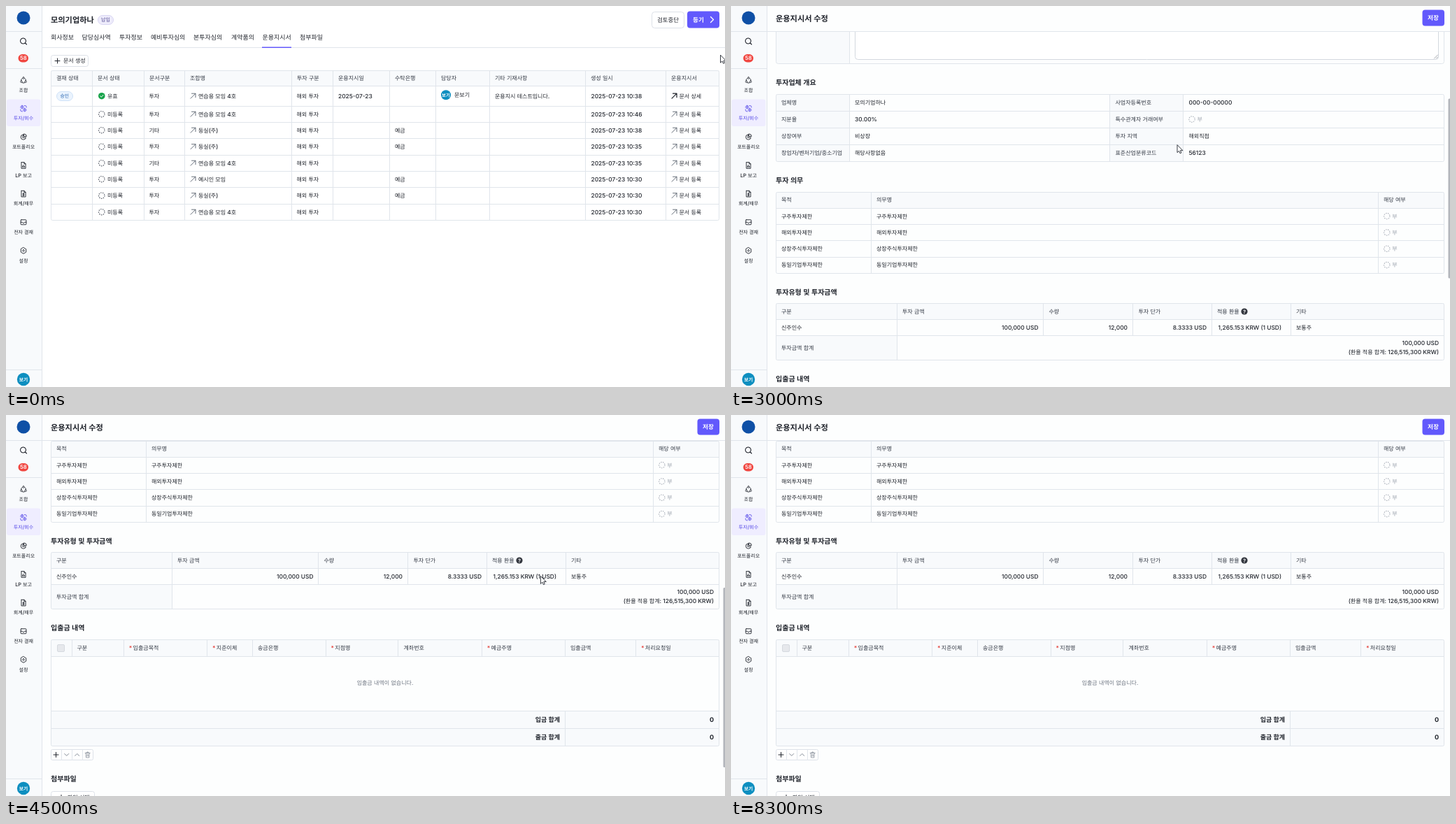
Recreate the animation shown at these times as an HTML page with a canvas. Size 1028 by 545 pixels, loop 9 s.

```html
<!DOCTYPE html>
<html lang="ko">
<head>
<meta charset="utf-8">
<title>운용지시서</title>
<style>
html, body { margin: 0; width: 100%; height: 100%; overflow: hidden; background: #fff; }
canvas { display: block; width: 1028px; height: 545px; }
</style>
</head>
<body>
<canvas id="stage"></canvas>
<script>
const W = 1028, H = 545, LOOP = 9000, STEP = 100;
const INK = '#20242c', SOFT = '#343a45', MUTED = '#9aa1ac', LINE = '#e0e5eb', PALE = '#f8fafc', PAGE = '#fdfefe';
const ACCENT = '#6259fc', RED = '#e5403a', TEAL = '#0e8fc0';
const HANGUL = '"Noto Sans CJK KR", "Noto Sans", sans-serif', LATIN = 'Inter, "Noto Sans", sans-serif';
const COMPANY = '모의기업하나', FUND = '연습용 모임 4호', SMALL = '둥실(주)', GROUP = '예시인 모임';
const PERSON = '문보기', NICK = '보기', BANK = '예금';

const canvas = document.getElementById('stage');
const ctx = canvas.getContext('2d');
const dpr = window.devicePixelRatio || 1;
canvas.width = W * dpr;
canvas.height = H * dpr;

// Hangul and Latin runs are set in separate fonts.
function text(str, x, y, size = 8, color = INK, weight = 500, align = 0) {
  const runs = str.match(/[가-힣]+|[^가-힣]+/g).map(s => {
    const font = /[가-힣]/.test(s) ? `${weight} ${size}px ${HANGUL}` : `${weight} ${size * 1.05}px ${LATIN}`;
    ctx.font = font;
    return { s, font, w: ctx.measureText(s).width };
  });
  x -= align * runs.reduce((sum, r) => sum + r.w, 0);
  ctx.fillStyle = color;
  for (const r of runs) {
    ctx.font = r.font;
    ctx.fillText(r.s, x, y + size * 0.37);
    x += r.w;
  }
}

function fill(x, y, w, h, color) {
  ctx.fillStyle = color;
  ctx.fillRect(x, y, w, h);
}

function box(x, y, r, b, radius, color, border) {
  ctx.beginPath();
  ctx.roundRect(x + 0.5, y + 0.5, r - x - 1, b - y - 1, radius);
  if (color) { ctx.fillStyle = color; ctx.fill(); }
  if (border) { ctx.strokeStyle = border; ctx.lineWidth = 1; ctx.stroke(); }
}

// A solid button without a border fills its whole box.
function button(x, y, r, b, radius, color) {
  ctx.beginPath();
  ctx.roundRect(x, y, r - x, b - y, radius);
  ctx.fillStyle = color;
  ctx.fill();
}

function disc(x, y, r, color) {
  ctx.beginPath();
  ctx.arc(x, y, r, 0, 7);
  ctx.fillStyle = color;
  ctx.fill();
}

function path(d, x, y, color = INK, width = 1, scale = 1) {
  ctx.save();
  ctx.translate(x, y);
  ctx.scale(scale, scale);
  ctx.strokeStyle = color;
  ctx.lineWidth = width;
  ctx.lineCap = ctx.lineJoin = 'round';
  ctx.stroke(new Path2D(d));
  ctx.restore();
}

function dotted(x, y, color) {
  const r = 4.2, dash = Math.PI * r / 9;
  ctx.beginPath();
  ctx.arc(x, y, r, 0, Math.PI * 2);
  ctx.strokeStyle = color;
  ctx.lineWidth = 1.1;
  ctx.setLineDash([dash, dash]);
  ctx.stroke();
  ctx.setLineDash([]);
}

const hline = (x, r, y) => fill(x, y, r - x, 1, LINE);
const vline = (x, y, b) => fill(x, y, 1, b - y, LINE);

function grid(xs, ys) {
  const r = xs[xs.length - 1], b = ys[ys.length - 1];
  ys.slice(1, -1).forEach(y => hline(xs[0], r, y));
  xs.slice(1, -1).forEach(x => vline(x, ys[0], b));
  box(xs[0], ys[0], r + 1, b + 1, 2, null, LINE);
}

function label(str, x, y) {
  if (str[0] === '*') {
    text('*', x, y + 0.5, 8, RED, 600);
    text(str.slice(1), x + 5.8, y, 8, SOFT);
  } else text(str, x, y, 8, SOFT);
}

const arrowIcon = (x, y, color, width) => path('M0 7L7 0M1.5 0H7V5.5', x, y - 3.5, color, width);
const plus = (x, y) => path('M-3.5 0H3.5M0-3.5V3.5', x, y);

// Sidebar
const DOC = 'M6 2h8l5 5v15H5V2zM14 2v5h5';
const MENU = [
  ['조합', 'M12 2a3 3 0 1 0 .01 0M5 14a3 3 0 1 0 .01 0M19 14a3 3 0 1 0 .01 0M8 6a8.5 8.5 0 0 0-4 7M16 6a8.5 8.5 0 0 1 4 7M8 20.5a8 8 0 0 0 8 0'],
  ['투자/회수', 'M7.5 2a5 5 0 1 0 .01 0M16 11.5a5 5 0 1 0 .01 0M15 2.5h2.5a4 4 0 0 1 4 4v2M2.5 15v2.500a4 4 0 0 0 4 4h2M16 14.500v4M7.500 5v4M14.5 16.500h3M6 7h3'],
  ['포트폴리오', 'M10 4a8.5 8.5 0 1 0 10 10h-10zM14 2a8 8 0 0 1 8 8h-8z'],
  ['LP 보고', DOC + 'M9 18v-4M12 18v-7M15 18v-3'],
  ['회계/재무', DOC + 'M14.5 11h-3a1.5 1.5 0 0 0 0 3.5h1a1.5 1.5 0 0 1 0 3.5h-3M12 9.5v10'],
  ['전자 결재', 'M5 4h14a2 2 0 0 1 2 2v12a2 2 0 0 1-2 2H5a2 2 0 0 1-2-2V6a2 2 0 0 1 2-2zM3 12h5c1 4 7 4 8 0h5'],
  ['설정', 'M12 2l8.5 5v10L12 22l-8.5-5V7zM12 9a3 3 0 1 0 .01 0']
];

function sidebar() {
  fill(0, 0, 51, H, PALE);
  vline(51, 0, H);
  [36, 89, 520].forEach(y => hline(0, 51, y));
  disc(25, 17, 9.5, '#0f50a6');
  path('M0-4a4 4 0 1 0 .01 0M3 3L5 5', 24.5, 50, INK, 1.1);
  button(17.5, 69, 32, 80.5, 5.7, '#f0453f');
  text('58', 24.8, 74.7, 7.4, '#fff', 600, 0.5);
  button(1, 133.5, 49.5, 172, 3, '#efedff');
  MENU.forEach(([name, icon], i) => {
    const y = 106 + i * 40.65, color = i === 1 ? '#5a4ee8' : INK;
    path(icon, 25 - 5.2, y - 5.2, color, 2.1, 0.435);
    text(name, 25, y + 14.2, 7, color, 500, 0.5);
  });
  disc(25, 534, 9.2, TEAL);
  text(NICK, 25, 534, 6.8, '#fff', 700, 0.5);
}

// List page
const LIST_X = [64, 123, 197, 255, 408, 467, 548, 614, 691, 828, 943, 1019];
const LIST_Y = [92, 114, 143, 166, 189, 213, 236, 259, 283, 306];
const LIST_HEAD = ['결재 상태', '문서 상태', '문서구분', '조합명', '투자 구분', '운용지시일', '수탁은행', '담당자', '기타 기재사항', '생성 일시', '운용지시서'];
const ROWS = [
  ['투자', FUND, '', '38'], ['투자', FUND, '', '46'], ['기타', SMALL, BANK, '38'], ['투자', SMALL, BANK, '35'],
  ['기타', FUND, '', '35'], ['투자', GROUP, BANK, '30'], ['투자', SMALL, BANK, '30'], ['투자', FUND, '', '30']
];
const TABS = [['회사정보', 64], ['담당심사역', 108.5], ['투자정보', 162], ['예비투자심의', 207], ['본투자심의', 268], ['계약품의', 322], ['운용지시서', 366.5], ['첨부파일', 420]];

function listPage(hover) {
  text(COMPANY, 64, 19.5, 11.2, INK, 700);
  box(131, 13, 154, 27, 6.5, '#eeecfb', '#d9d6f3');
  text('납입', 142.4, 19.8, 7, '#4d4690', 500, 0.5);
  box(923, 8, 970, 32, 4, '#fff', '#dde1e8');
  text('검토중단', 946.5, 19.5, 8.4, INK, 500, 0.5);
  button(974, 7.5, 1020, 31.5, 4, ACCENT);
  text('등기', 982, 19.5, 8.6, '#fff', 700);
  path('M0-4L4 0L0 4', 1007.5, 19.5, '#fff', 1.3);
  hline(52, W, 59);
  TABS.forEach(([name, x]) => text(name, x, 45, 8.95));
  fill(366, 58.5, 42, 1.5, ACCENT);
  box(64, 70, 118, 87, 3, '#fff', '#dde1e8');
  plus(73.5, 78.5);
  text('문서 생성', 82, 78.5);

  fill(64, 92, 956, 22, PALE);
  if (hover >= 0) fill(64, LIST_Y[hover + 1], 956, LIST_Y[hover + 2] - LIST_Y[hover + 1], PALE);
  grid(LIST_X, LIST_Y);
  LIST_HEAD.forEach((name, i) => text(name, LIST_X[i] + 8, 103.5, 8, SOFT));
  ROWS.forEach(([kind, fund, bank, minute], i) => {
    const y = (LIST_Y[i + 1] + LIST_Y[i + 2]) / 2 + 0.2, first = i === 0;
    if (first) {
      box(72, 122, 96, 136, 6.5, '#ebf4fe', '#cfe2f8');
      text('승인', 83.8, y, 6.8, '#1c5cab', 500, 0.5);
      disc(136.8, y, 4.8, '#17a34a');
      path('M-2 0L-.5 1.6L2.2-1.4', 136.8, y, '#fff');
      text('2025-07-23', 475, y);
      disc(629, 127.3, 7, TEAL);
      text(NICK, 629, 127.3, 6.4, '#fff', 700, 0.5);
      text(PERSON, 641, 127.5);
      text('운용지시 테스트입니다.', 699, y);
    } else dotted(136.8, y, '#4a505c');
    text(first ? '유효' : '미등록', 145, y);
    text(kind, 204.5, y);
    arrowIcon(264, y, '#59616e', 0.9);
    text(fund, 275, y);
    text('해외 투자', 415.5, y);
    if (bank) text(bank, 556, y);
    text('2025-07-23 10:' + minute, 836.5, y);
    arrowIcon(952, y, first ? INK : '#59616e', first ? 1.2 : 0.9);
    text(first ? '문서 상세' : '문서 등록', 962.5, y);
  });
}

function fadedList() {
  fill(0, 0, W, H, PAGE);
  ctx.globalAlpha = 0.055;
  listPage(-1);
  ctx.globalAlpha = 1;
  fill(0, 0, 52, H, PALE);
  disc(25, 17, 6, '#fff');
  button(974, 8, 1020, 31, 4, PALE);
  fill(64, 92, 956, 22, PALE);
  fill(64, 143, 956, 23, PALE);
}

// Form page
const heading = (str, y) => text(str, 64, y, 10, INK, 700);

function no(x, y) {
  dotted(x, y, '#a6acb6');
  text('부', x + 7.5, y, 8, MUTED);
}

function overview(hover) {
  heading('운용지시서 개요', 42);
  fill(64, 60, 106, 199, PALE);
  fill(542, 60, 105, 90, PALE);
  [93, 126, 150].forEach(y => hline(64, 1019, y));
  vline(169, 60, 259);
  [541, 646].forEach(x => vline(x, 60, 150));
  box(64, 59, 1020, 260, 3, null, LINE);
  [['구분', 72, 76], ['조합명', 72, 109.5], ['수탁은행', 72, 138], ['*기타 기재사항', 72, 204],
   ['*담당자', 549.5, 76], ['*운용지시일', 549.5, 109.5], ['계좌번호', 549.5, 138]].forEach(a => label(...a));
  text('투자', 177, 76);
  text(FUND, 177, 109.5);
  text('000-0000-0000-000', 654.5, 138);
  box(654, 64, 1012, 89, 4, '#fff', '#dde2e8');
  text(PERSON, 662, 76.3);
  path('M-3.3-1.6L0 1.7L3.3-1.6', 1000, 76.3, INK, 1.2);
  box(654, 97, 1012, 122, 4, '#fff', '#dde2e8');
  text('날짜 선택', 662, 109.5, 8, MUTED);
  path('M-3.5-2.8H3.5V3.5H-3.5ZM-3.5-.5H3.5M-1.8-4V-2.8M1.8-4V-2.8', 999, 110, SOFT, 0.9);
  box(177, 155, 1012, 254, 4, '#fff', hover ? '#7d76dc' : '#d3d8df');
  text('기타기재사항 입력', 185, 167, 8, MUTED);
  path('M0 5L5 0M3 5L5 3', 1005.5, 247, '#7d838d', 0.7);
}

function investee() {
  heading('투자업체 개요', 286);
  fill(64, 303, 106, 96, PALE);
  fill(542, 303, 105, 96, PALE);
  grid([64, 169, 541, 646, 1019], [303, 327, 351, 375, 399]);
  [['업체명', COMPANY, '사업자등록번호', '000-00-00000'], ['지분율', '30.00%', '특수관계자 거래여부', ''],
   ['상장여부', '비상장', '투자 지역', '해외직접'], ['창업자/벤처기업/중소기업', '해당사항없음', '표준산업분류코드', '56123']
  ].forEach(([a, b, c, d], i) => {
    const y = 315 + i * 24;
    label(a, 72, y);
    text(b, 177, y);
    label(c, 549.5, y);
    if (d) text(d, 654.5, y); else no(659, y);
  });
}

function duties() {
  heading('투자 의무', 426);
  fill(64, 443, 956, 23, PALE);
  grid([64, 200, 925, 1019], [443, 466, 489, 512, 536, 559]);
  [['목적', 72], ['의무명', 208], ['해당 여부', 933]].forEach(([s, x]) => label(s, x, 454.5));
  ['구주', '해외', '상장주식', '동일기업'].forEach((s, i) => {
    const y = 477.6 + i * 23.3;
    text(s + '투자제한', 72, y);
    text(s + '투자제한', 208, y);
    no(937.8, y);
  });
}

function amounts(selX) {
  heading('투자유형 및 투자금액', 180);
  fill(64, 196, 956, 23, PALE);
  fill(64, 242, 173, 35, PALE);
  [219, 242].forEach(y => hline(64, 1019, y));
  vline(237, 196, 277);
  [446, 574, 687, 800].forEach(x => vline(x, 196, 242));
  box(64, 196, 1020, 278, 2, null, LINE);
  [['구분', 72], ['투자 금액', 245], ['수량', 454.5], ['투자 단가', 582.5], ['적용 환율', 695], ['기타', 808]]
    .forEach(([s, x]) => label(s, x, 208));
  disc(734, 208, 4.6, '#33373f');
  text('?', 734, 208, 7, '#fff', 700, 0.5);
  text('신주인수', 72, 230.7);
  [['100,000 USD', 439.5], ['12,000', 567], ['8.3333 USD', 680], ['1,265.153 KRW (1 USD)', 787]]
    .forEach(([s, x]) => text(s, x, 230.7, 8, INK, 500, 1));
  text('보통주', 808, 230.7);
  label('투자금액 합계', 72, 260);
  text('100,000 USD', 1012, 253.5, 8, INK, 500, 1);
  const total = color => text('(환율 적용 합계: 126,515,300 KRW)', 1012, 266, 8, color, 500, 1);
  total(INK);
  if (selX > 884) {
    ctx.save();
    ctx.beginPath();
    ctx.rect(884, 260, selX - 884, 12);
    ctx.clip();
    fill(884, 260, 130, 12, '#2f64c9');
    total('#fff');
    ctx.restore();
  }
}

function transfers() {
  heading('입출금 내역', 304);
  fill(64, 321, 956, 24, PALE);
  fill(64, 423, 956, 50, PALE);
  [345, 423, 448].forEach(y => hline(64, 1019, y));
  [94, 168, 287, 352, 457, 560, 680, 799, 900].forEach(x => vline(x, 321, 345));
  vline(799, 423, 473);
  box(64, 321, 1020, 474, 2, null, LINE);
  box(73, 328, 84, 339, 1.5, '#e6e8ec', '#d5d9df');
  [['구분', 101.5], ['*입출금목적', 175.8], ['*지준이체', 295], ['송금은행', 360], ['*지점명', 464.5],
   ['계좌번호', 568.5], ['*예금주명', 687.8], ['입출금액', 807], ['*처리요청일', 908]].forEach(([s, x]) => label(s, x, 333));
  text('입출금 내역이 없습니다.', 542, 383.5, 8, '#6f7682', 400, 0.5);
  ['입금 합계', '출금 합계'].forEach((s, i) => {
    text(s, 792, 435.7 + i * 25, 9, INK, 700, 1);
    text('0', 1012, 435.7 + i * 25, 8.6, INK, 700, 1);
  });
  box(64, 478, 125, 494, 2, '#fff', '#dde1e8');
  [79, 94, 109].forEach(x => vline(x, 478, 494));
  plus(71.5, 486);
  path('M-3-1.5L0 1.5L3-1.5', 86.7, 486, '#858c97');
  path('M-3 1.5L0-1.5L3 1.5', 101.7, 486, '#858c97');
  path('M-3.5-2.5H3.5M-1-2.5V-4H1V-2.5M-2.6-2.5L-2.2 4H2.2L2.6-2.5M-.8-.5V2M.8-.5V2', 116.7, 486, '#858c97', 0.8);
  heading('첨부파일', 520.5);
  box(64, 538, 127, 556, 3, '#fff', '#dde1e8');
  plus(79, 547);
  text('파일 선택', 88, 547.5);
}

function formPage(scroll, cur, selX) {
  const shift = 16 - Math.round(scroll);
  fill(52, 0, W - 52, H, PAGE);
  ctx.save();
  ctx.beginPath();
  ctx.rect(52, 37, W - 52, H - 37);
  ctx.clip();
  ctx.translate(0, shift);
  overview(overTextarea(cur, shift));
  investee();
  duties();
  ctx.translate(0, 406);
  amounts(selX);
  transfers();
  ctx.restore();
  hline(52, W, 36);
  text('운용지시서 수정', 64, 17.5, 11.2, INK, 700);
  button(988.5, 5.5, 1020, 28.5, 4, ACCENT);
  text('저장', 1004, 17, 8.6, '#fff', 700, 0.5);
}

const overTextarea = ([x, y], shift) => x > 177 && x < 1012 && y > 155 + shift && y < 253 + shift;

// Motion: each key is a time followed by values.
const CURSOR = [
  [0, 1021.5, 70.5], [100, 1015, 80], [300, 985, 130], [500, 965, 155], [1600, 965, 155], [2000, 800, 178], [2300, 638, 199],
  [3000, 638, 199], [3400, 636, 212], [3800, 695, 228], [4000, 702, 234], [4100, 695, 230], [4200, 695, 230], [4400, 722, 222],
  [4900, 934, 266], [5200, 885, 265], [5300, 900, 265], [5500, 992, 265], [5800, 1010, 265], [5900, 1010, 265],
  [6400, 852, 262], [6900, 992, 270], [7100, 992, 270], [7400, 900, 279], [8000, 82, 112]
];
const SCROLL = [[2400, 0], [2500, 16], [2600, 50], [2700, 72], [2800, 72], [2900, 120], [3000, 193], [3200, 350], [3400, 422]];
const SELECT = [[5200, 884], [5300, 898], [5500, 990], [5800, 1012]];

function at(keys, t) {
  const i = keys.findIndex(k => k[0] >= t);
  if (i === 0) return keys[0].slice(1);
  if (i < 0) return keys[keys.length - 1].slice(1);
  const a = keys[i - 1], b = keys[i], p = (t - a[0]) / (b[0] - a[0]);
  return a.slice(1).map((v, j) => v + (b[j + 1] - v) * p);
}

const ARROW = 'M0 0V10.6L2.5 8.4L4.1 11.8L5.9 11L4.4 7.7H7.5Z';
const BEAM = 'M-2.3-5H2.3M0-5V5M-2.3 5H2.3';

function pointer([x, y], beam) {
  if (beam) return path(BEAM, x + 0.5, y + 1.5, '#15171c', 1);
  ctx.save();
  ctx.translate(x, y);
  ctx.fillStyle = '#fff';
  ctx.fill(new Path2D(ARROW));
  ctx.restore();
  path(ARROW, x, y, '#23272f', 0.9);
}

function draw(t) {
  ctx.setTransform(dpr, 0, 0, dpr, 0, 0);
  ctx.globalAlpha = 1;
  ctx.textRendering = 'geometricPrecision';
  fill(0, 0, W, H, '#fff');
  const cur = at(CURSOR, t);
  let beam = false;
  if (t < 1300) {
    const row = cur[0] < 1019 ? LIST_Y.findIndex(y => y > cur[1]) - 2 : -1;
    sidebar();
    listPage(row);
  } else if (t < 1700) {
    fadedList();
  } else {
    const [scroll] = at(SCROLL, t);
    const selX = t < 6400 ? at(SELECT, t)[0] : 0;
    fill(0, 0, 52, H, PALE);
    ctx.globalAlpha = Math.min(1, (t - 1600) / 300);
    sidebar();
    formPage(scroll, cur, selX);
    ctx.globalAlpha = t < 8200 ? 1 : t < 8300 ? 0.5 : 0;
    button(1025.5, 44 + (scroll - 16) / 2, 1029, 301 + (scroll - 16) / 2, 1.5, '#b3b6bc');
    ctx.globalAlpha = 1;
    const onTotal = scroll > 400 && cur[0] >= 883 && cur[0] <= 1013 && cur[1] > 259 && cur[1] < 269;
    beam = onTotal || overTextarea(cur, 16 - scroll);
  }
  if (t < 8100) pointer(cur, beam);
}

let last = -1;
function frame(now) {
  const t = Math.floor((now % LOOP) / STEP) * STEP;
  if (t !== last) draw(last = t);
  requestAnimationFrame(frame);
}
requestAnimationFrame(frame);
</script>
</body>
</html>
```
